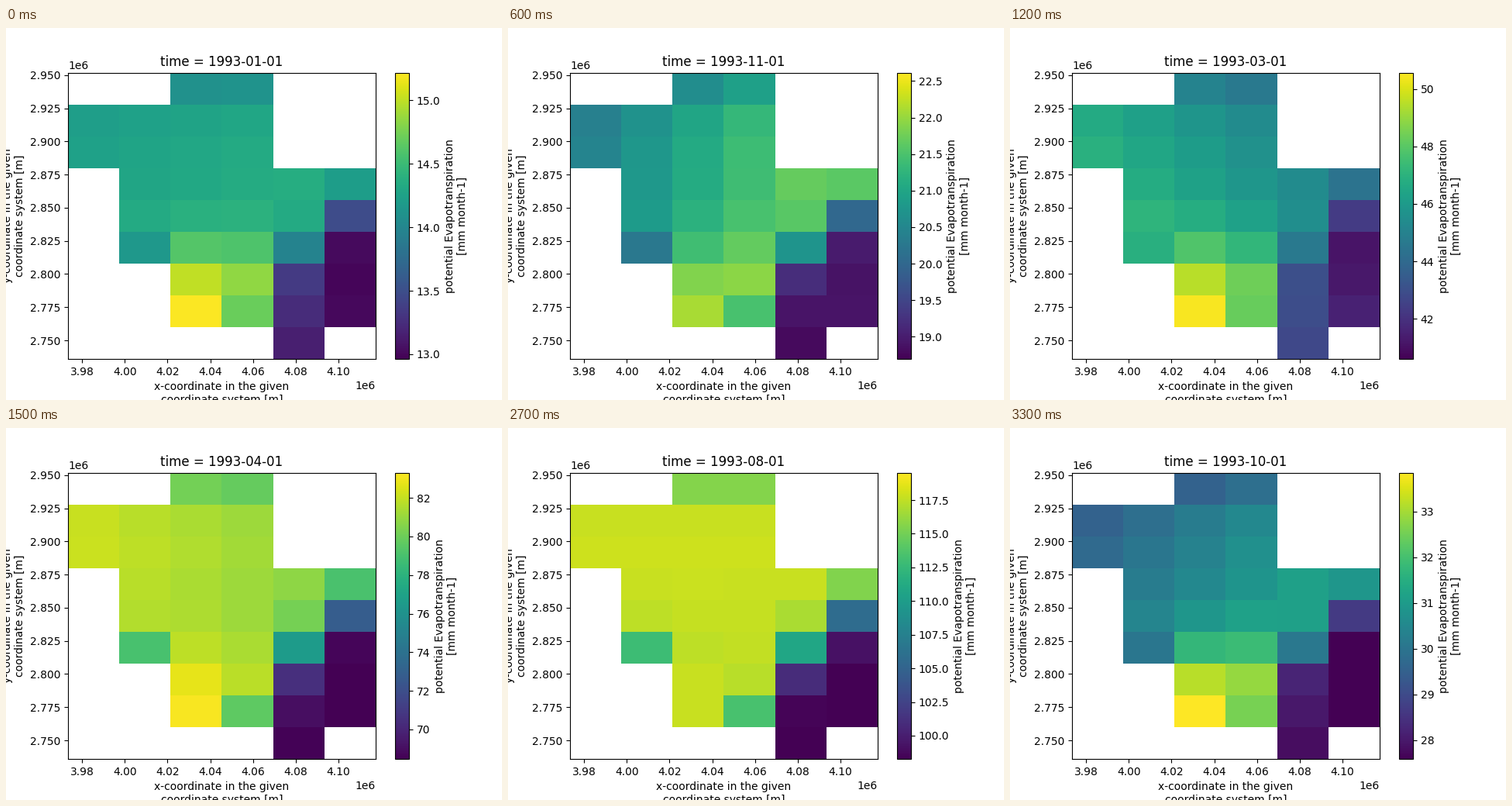
Write a matplotlib script that moves like this. It is 640 px wide and 480 px high and loops after 3.6 s.

```python
import numpy as np
import matplotlib.pyplot as plt
from matplotlib.animation import FuncAnimation
from matplotlib.colors import Normalize

CELL = 24000
LEFT, BOTTOM = 3.9734e6, 2.73586e6
COLS, ROWS = 6, 9
ORDER = [1, 2, 11, 12, *range(3, 11)]

# month: low, high, then the weights of
# base level, north gradient, west gradient, valley, relief
KEYS = {
    1: (12.962, 15.218, 0.60, 0.00, -0.03, 0.40, 0.65),
    2: (12.743, 17.820, 0.27, -0.18, 0.17, 0.55, 0.08),
    4: (68.457, 83.310, 0.85, 0.04, 0.05, 0.16, 0.82),
    6: (104.22, 128.98, 0.87, 0.10, 0.05, 0.05, 0.78),
    7: (115.70, 136.90, 0.89, 0.07, 0.03, 0.04, 0.84),
    8: (98.260, 119.54, 0.91, 0.03, 0.00, 0.03, 0.90),
    10: (27.587, 33.847, 0.50, -0.06, -0.13, 0.50, 0.75),
    12: (9.8015, 11.384, 0.80, 0.04, -0.26, 0.00, 0.90),
}

row, col = np.mgrid[:ROWS, :COLS]

# the region is a staircase falling from the north-west to the south-east
first = np.select([row == 0, row < 3, row < 6, row < 8], [2, 0, 1, 2], 4)
last = np.select([row < 3, row < 8], [3, 5], 4)
outside = (col < first) | (col > last)

north = (4 - row) / 4
west = (2.5 - col) / 2.5
valley = np.exp(-((col - 2) ** 2 + (row - 7) ** 2) / 4)

# mountains: a steep front in the south-east, one peak, the northern rim
east = 5 - col
front = 1 / (1 + np.exp(-2.5 * (row - 3.8 - 1.05 * east - 0.4 * east ** 2)))
peak = np.exp(-3 * ((col - 1) ** 2 + (row - 5) ** 2))
relief = front + 0.25 * peak + 0.14 * np.exp(-2 * row ** 2)


def month_field(month):
    """Colour limits and cell values of one month."""
    low, high, base, n, w, v, d = (
        np.interp(month, list(KEYS), part) for part in zip(*KEYS.values()))
    share = base + n * north + w * west + v * valley - d * relief
    z = low + (high - low) * np.clip(share, 0, 1)
    return low, high, np.ma.masked_array(z, outside)


fig, ax = plt.subplots(figsize=(6.4, 4.8), dpi=100)
x = LEFT + CELL * np.arange(COLS + 1)
y = BOTTOM + CELL * np.arange(ROWS, -1, -1)
mesh = ax.pcolormesh(x, y, month_field(1)[2], cmap="viridis")
ax.set_xlim(x[0], x[-1])
ax.set_ylim(y[-1], y[0])
ax.set_xlabel("x-coordinate in the given\ncoordinate system [m]")
ax.set_ylabel("y-coordinate in the given\ncoordinate system [m]")
title = ax.set_title("")
bar = fig.colorbar(mesh, ax=ax)
bar.set_label("potential Evapotranspiration\n[mm month-1]")


def draw(i):
    low, high, z = month_field(ORDER[i])
    mesh.set_array(z)
    # a fresh norm moves both limits at once
    mesh.set_norm(Normalize(low, high))
    title.set_text(f"time = 1993-{ORDER[i]:02d}-01")
    return mesh, title


anim = FuncAnimation(fig, draw, frames=len(ORDER), interval=300,
                     init_func=lambda: draw(0), repeat=True, repeat_delay=0)
plt.show()
```
